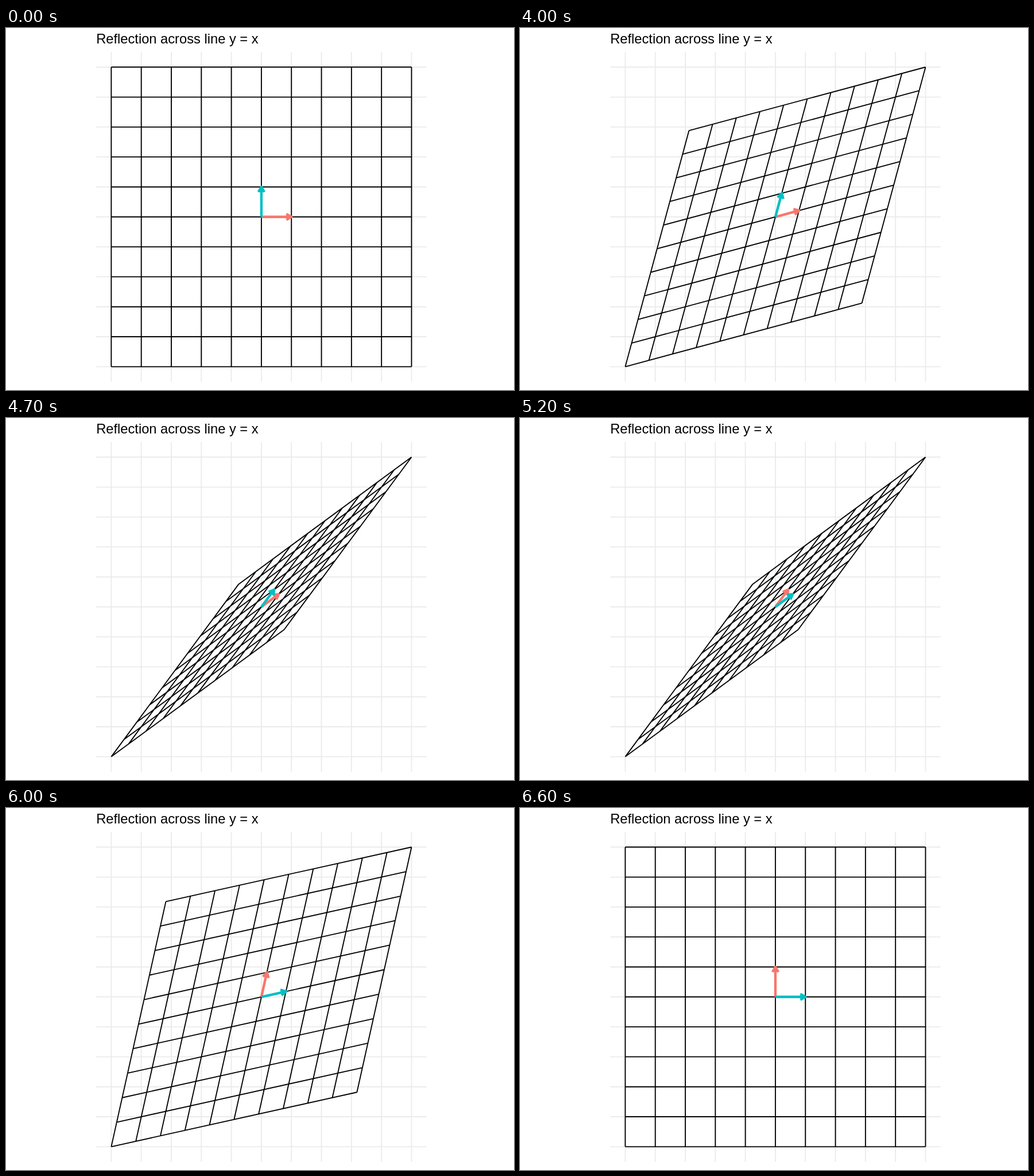
An HTML page that plays this animation: 885x632 px, repeating every 10000 ms.

```html
<!DOCTYPE html>
<html lang="en">
<head>
<meta charset="utf-8">
<title>Reflection across line y = x</title>
<style>
  html, body { margin: 0; width: 100%; height: 100%; overflow: hidden; background: #fff; }
  svg { display: block; width: 885px; height: 632px; }
  text { font: 23.7px "Liberation Sans", Arial, Helvetica, sans-serif; }
  path { fill: none; stroke-width: 1.87; }
  #back { stroke: #ebebeb; }
  #grid { stroke: #000; }
  .arrow { stroke-width: 4.4; stroke-linejoin: round; }
  #i { stroke: #f8766d; }
  #j { stroke: #00bfc4; }
</style>
</head>
<body>
<svg viewBox="0 0 885 632">
  <text x="157.2" y="27">Reflection across line y = x</text>
  <path id="back"/>
  <path id="grid"/>
  <path id="i" class="arrow"/>
  <path id="j" class="arrow"/>
</svg>
<script>
  const LOOP = 10000, STEP = 100, START = 3300, STEPS = 33;
  const CX = 444.93, CY = 329.8, UNIT = 52.31, N = 5;
  const HEAD = 10.2, SPREAD = Math.PI / 6;

  const setPath = (id, d) => document.getElementById(id).setAttribute("d", d);
  const pt = (x, y) => x.toFixed(2) + " " + y.toFixed(2);

  // Blend of the identity and the swap of x and y, in screen coordinates
  const place = (x, y, p) => [
    CX + UNIT * (x + p * (y - x)),
    CY - UNIT * (y + p * (x - y))
  ];

  function gridPath(p, reach) {
    const line = (a, b) => "M" + pt(...place(...a, p)) + "L" + pt(...place(...b, p));
    let d = "";
    for (let k = -N; k <= N; k++) {
      d += line([k, -reach], [k, reach]) + line([-reach, k], [reach, k]);
    }
    return d;
  }

  function arrowPath(x, y, p) {
    const [tx, ty] = place(x, y, p);
    const angle = Math.atan2(ty - CY, tx - CX);
    const wing = turn => pt(tx - HEAD * Math.cos(angle + turn), ty - HEAD * Math.sin(angle + turn));
    return `M${pt(CX, CY)}L${pt(tx, ty)}M${wing(SPREAD)}L${pt(tx, ty)}L${wing(-SPREAD)}`;
  }

  let shown = -1;
  function draw(now) {
    const t = now % LOOP;
    const step = Math.min(STEPS, Math.max(0, Math.floor((t - START) / STEP)));
    if (step !== shown) {
      shown = step;
      const p = step / STEPS;
      setPath("grid", gridPath(p, N));
      setPath("i", arrowPath(1, 0, p));
      setPath("j", arrowPath(0, 1, p));
    }
  }

  setPath("back", gridPath(0, N + 0.5));
  draw(0);
  const origin = performance.now();
  (function tick() {
    draw(performance.now() - origin);
    requestAnimationFrame(tick);
  })();
</script>
</body>
</html>
```
